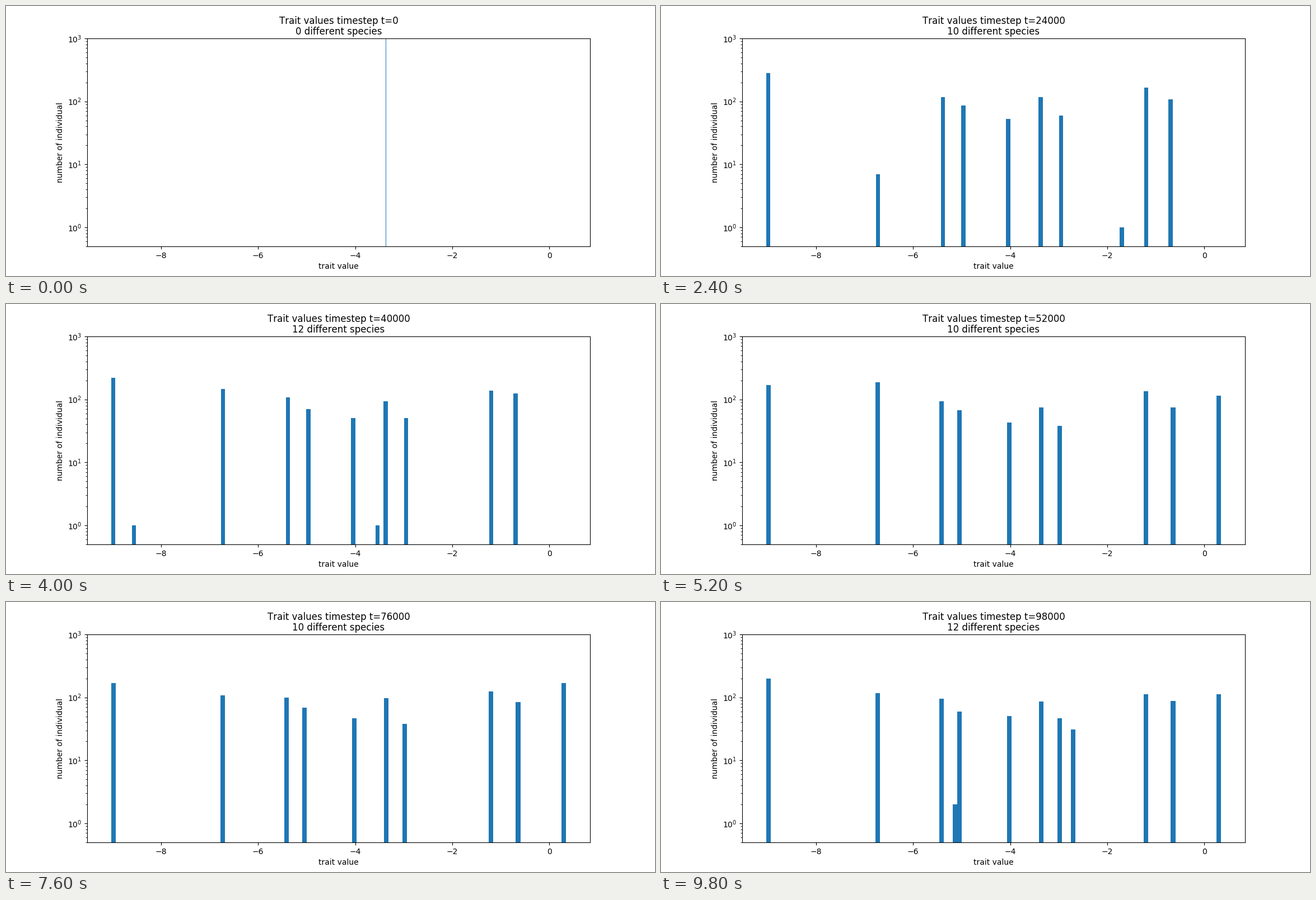
Write a matplotlib script that moves like this. It is 1159 px wide and 483 px high and loops after 10000 ms.

```python
import numpy as np
import matplotlib.pyplot as plt
from matplotlib.animation import FuncAnimation

STEPS = 50
TOTAL = 1000
GROWTH = 1.8
FOUNDER, FOUNDER_LEVEL = -3.369, 95

# trait, time of birth, population the species settles at
SPECIES = [
    (-9.02, 1, 210), (-6.723, 11, 145), (-5.397, 3, 95),
    (-5.136, 41, 2), (-4.998, 2.2, 72), (-4.03, 2.3, 50),
    (-2.963, 3.1, 58), (-2.704, 46.9, 45), (-1.198, 2.8, 130),
    (-0.653, 3, 95), (0.339, 23, 130),
]

# lone mutants that vanish after two steps: trait, first step
MUTANTS = [(-4.549, 4), (-1.7, 11), (0.339, 18), (-8.563, 19),
           (-3.534, 19), (-0.553, 32), (-2.704, 41)]

plt.rcParams["text.kerning_factor"] = 6
rng = np.random.default_rng(4)
steps = np.arange(STEPS)


def drift():
    """Smoothed random fluctuation around a settled population."""
    return np.exp(np.convolve(rng.normal(0, 0.35, STEPS), np.ones(6) / 6, "same"))


def settle(born, level):
    """Exponential growth from one individual up to a drifting level."""
    age = steps - born
    size = np.minimum(np.exp(GROWTH * np.maximum(age, 0)), level * drift())
    return np.where(age >= 0, size, 0)


founder = np.maximum(TOTAL * np.exp(-(steps / 6.5) ** 2), FOUNDER_LEVEL * drift())
sizes = np.array([founder] + [settle(born, level) for _, born, level in SPECIES])
sizes *= TOTAL / sizes.sum(axis=0)
sizes = np.where(sizes > 0, np.maximum(np.round(sizes), 1), 0)
lone = [(steps >= first) & (steps < first + 2) for _, first in MUTANTS]
sizes = np.vstack([sizes, lone])
traits = np.array([FOUNDER] + [row[0] for row in SPECIES + MUTANTS])

fig, ax = plt.subplots(figsize=(11.59, 4.83), dpi=100)


def draw(i):
    ax.clear()
    alive = sizes[:, i] > 0
    ax.hist(traits[alive], bins=100, weights=sizes[alive, i], log=True)
    ax.set_xlim(traits.min() - 0.5, traits.max() + 0.5)
    ax.set_ylim(0.5, TOTAL)
    ax.set_xlabel("trait value")
    ax.set_ylabel("number of individual")
    # the species tally trails the histogram by one step
    known = np.count_nonzero(sizes[:, i - 1]) if i else 0
    ax.set_title(f"Trait values timestep t={2000 * i}\n{known} different species",
                 linespacing=1.05, pad=5.3)
    return []


anim = FuncAnimation(fig, draw, frames=STEPS, init_func=lambda: [],
                     interval=200, repeat=True, repeat_delay=0)
plt.show()
```
